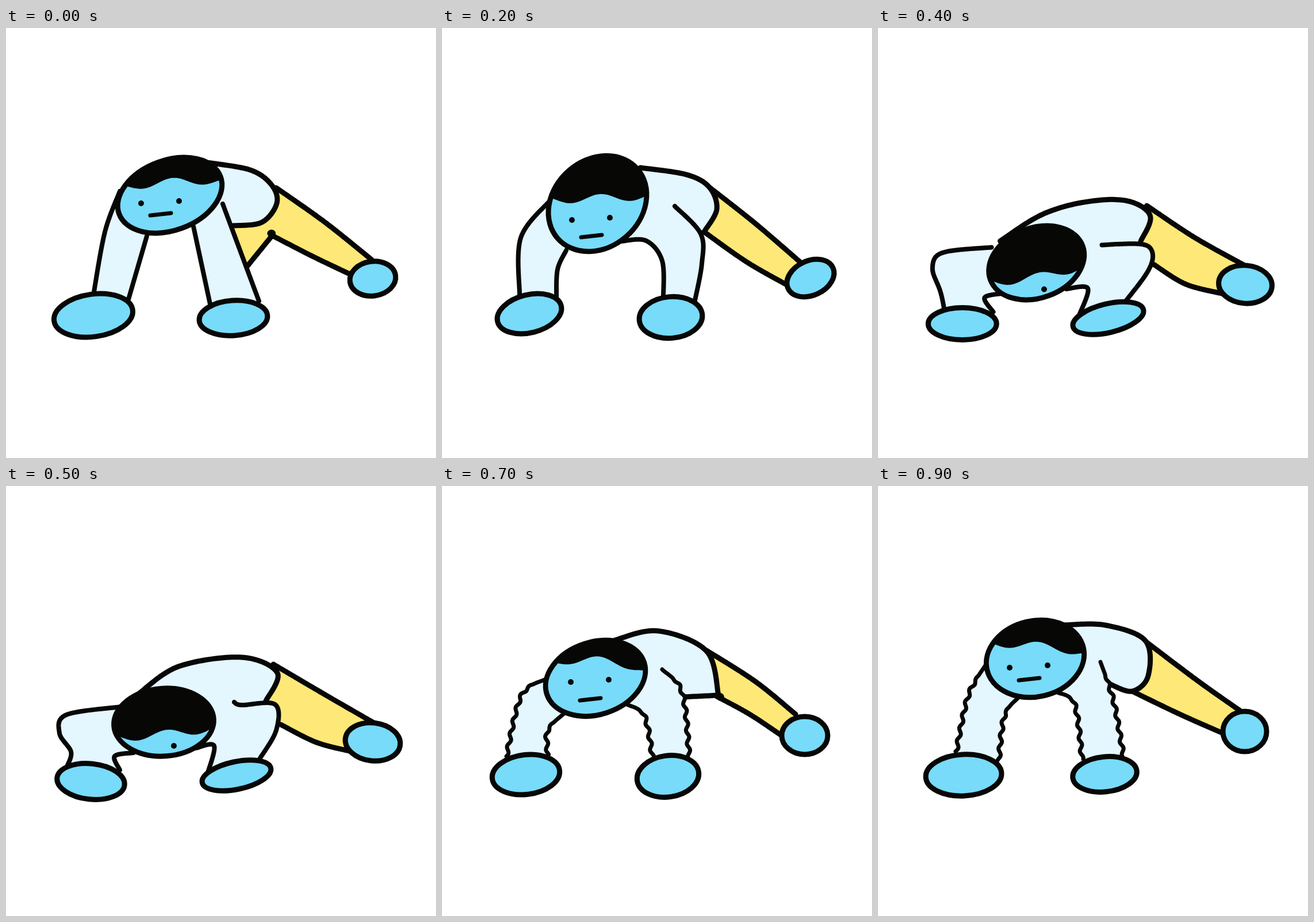
Recreate the animation shown at these times as an HTML page with a canvas. Size 748 by 748 pixels, loop 1 s.

```html
<!DOCTYPE html>
<html lang="en">
<head>
<meta charset="utf-8">
<title>Push-up</title>
<style>
  html, body { margin: 0; height: 100%; overflow: hidden; background: #fff; }
  canvas { display: block; width: 100vw; height: 100vh; }
</style>
</head>
<body>
<canvas width="748" height="748"></canvas>
<script>
const ctx = document.querySelector('canvas').getContext('2d');
const INK = '#070706', SKIN = '#78dbf9', SHIRT = '#e4f7fe', PANTS = '#fee877';
const STEP = 100, SAMPLES = 90, RIPPLE = 23;
const { PI, sin, cos, min, max, hypot, floor } = Math;

// Smooth curve through a few x,y pairs.
function curve(flat) {
  const n = flat.length / 2;
  const at = (i, d) => flat[2 * max(0, min(n - 1, i)) + d];
  return Array.from({ length: SAMPLES + 1 }, (_, i) => {
    const s = i / SAMPLES * (n - 1), j = min(floor(s), n - 2), f = s - j;
    return [0, 1].map(d => {
      const a = at(j - 1, d), b = at(j, d), c = at(j + 1, d), e = at(j + 2, d);
      return b + f / 2 * (c - a + f * (2 * a - 5 * b + 4 * c - e + f * (3 * (b - c) + e - a)));
    });
  });
}

// Sleeve wrinkles: an even ripple along the arc length that fades in below the shoulder.
function ripple(points, size) {
  let len = 0;
  return points.map(([x, y], i) => {
    const p = points[max(0, i - 1)], q = points[min(SAMPLES, i + 1)];
    const dx = q[0] - p[0], dy = q[1] - p[1], d = hypot(dx, dy) || 1;
    if (i) len += hypot(x - p[0], y - p[1]);
    const k = size * min(1, max(0, len / 20 - 1)) * sin(len / RIPPLE * 2 * PI) / d;
    return [x - dy * k, y + dx * k];
  });
}

// The fringe is a chord across the head with a dip and one and a half waves.
function fringe(headX, [left, right, dip]) {
  return Array.from({ length: SAMPLES + 1 }, (_, i) => {
    const u = i / SAMPLES;
    const wave = sin(PI * u) ** 0.5 || 0;
    return [headX - 88 + 176 * u, left + (right - left) * u + wave * (dip + 9 * cos(3 * PI * (u - 0.2)))];
  });
}

// Ellipses: [x, y, rx, ry, degrees]. Limbs: [edge, edge].
// Hair: [left y, right y, dip]. Face: [mouth x, mouth y, eye lift], or one eye [x, y].
function pose(p) {
  const arm = edges => edges.map(e => ripple(curve(e), p.wrinkle));
  return {
    ...p,
    leg: p.leg.map(curve), torso: curve(p.torso),
    left: arm(p.left), right: arm(p.right),
    hair: fringe(p.head[0], p.hair)
  };
}

function mix(a, b) {
  if (typeof a === 'number') return (a + b) / 2;
  if (Array.isArray(a)) return a.map((v, i) => mix(v, b[i]));
  return Object.fromEntries(Object.keys(a).map(k => [k, mix(a[k], b[k])]));
}

const high = pose({
  wrinkle: 0,
  leg: [[470,278, 555,338, 636,403], [420,414, 463,361, 463,361, 535,398, 600,429]],
  torso: [350,234, 425,247, 462,273, 471,305, 445,338, 395,344],
  left: [[198,284, 172,355, 152,465], [245,362, 213,472]],
  right: [[377,306, 440,475], [326,345, 355,480]],
  hands: [[152,500,69,37,-8], [395.5,504.5,59.5,30.5,-4]],
  foot: [638,436,40,30,-8],
  head: [285,291,94,61,-20],
  hair: [274, 264, 1],
  face: [269, 324, 19]
});

const lowering = pose({
  wrinkle: 0,
  leg: [[465,277, 545,340, 624,408], [455,354, 530,407, 602,448]],
  torso: [345,243, 425,255, 465,277, 478,315, 457,353],
  left: [[188,300, 137,365, 135,465], [216,387, 201,420, 199,468]],
  right: [[405,310, 450,358, 452,410, 440,474], [312,371, 355,370, 383,405, 385,470]],
  hands: [[152,497,57,33,-14], [398,503.5,55,36,-5]],
  foot: [641,435,43,30,-25],
  head: [270.5,305.5,92,76,-41],
  hair: [293, 289, 7],
  face: [260, 362, 28]
});

const low = pose({
  wrinkle: 0,
  leg: [[470,308, 545,365, 630,411], [482,408, 530,445, 595,462]],
  torso: [195,379, 270,336, 345,307, 430,298, 475,325, 462,368],
  left: [[195,379, 110,386, 97,432, 123,490], [214,459, 182,468, 203,494]],
  right: [[382,379, 450,371, 481,400, 422,474], [325,452, 368,454, 350,497]],
  hands: [[146,515,60,25,-6], [400,506,65,26,-15]],
  foot: [640,447,45,33,3],
  head: [277,406,84,63,-36],
  hair: [436, 395, 21],
  face: [286, 457]
});

const lowest = pose({
  wrinkle: 0,
  leg: [[465,310, 555,363, 640,412], [478,415, 540,446, 602,462]],
  torso: [230,362, 300,314, 410,298, 472,325, 452,374],
  left: [[200,384, 105,398, 93,430, 113,462, 107,486], [222,464, 189,470, 198,494]],
  right: [[397,376, 410,381, 468,380, 470,425, 441,475], [330,456, 362,452, 350,502]],
  hands: [[147.5,514,59,31,6], [401,503.5,61,24,-12]],
  foot: [638,445,48,33,7],
  head: [274.5,411,87,59,-4],
  hair: [432, 417, 9],
  face: [292, 452]
});

const pushing = pose({
  wrinkle: 2.5,
  leg: [[440,303, 550,346, 630,415], [465,380, 530,411, 600,461]],
  torso: [278,305, 365,282, 448,309, 467,380, 467,380, 418,388],
  left: [[188,367, 145,376, 110,430, 105,486], [212,423, 194,436, 192,485]],
  right: [[384,347, 412,368, 416,395, 438,474], [312,408, 345,418, 360,478]],
  hands: [[147.5,505.5,55.5,31,-7], [400.5,502,57.5,29.5,-6]],
  foot: [638,446,41,32,5],
  head: [266,368.5,84,56,-18],
  hair: [358, 352, 0],
  face: [260, 404, 18]
});

const rising = pose({
  wrinkle: 2.5,
  leg: [[460,286, 545,340, 615,397], [478,366, 535,397, 595,437]],
  torso: [298,269, 375,252, 460,287, 481,364, 481,364, 420,367],
  left: [[180,336, 138,365, 112,470], [212,396, 184,425, 184,467]],
  right: [[383,319, 418,360, 430,470], [322,380, 352,400, 366,470]],
  hands: [[146,502,59,34.5,-7], [393,505,54,36,-8]],
  foot: [631,434,40,33,0],
  head: [267,334.5,89,63,-18],
  hair: [309, 323, -11],
  face: [258, 371, 30]
});

const raised = pose({
  wrinkle: 2.5,
  leg: [[465,270, 555,338, 630,391], [442,357, 525,397, 602,431]],
  torso: [322,242, 395,242, 465,269, 470,330, 442,357, 402,344],
  left: [[188,310, 157,365, 136,462], [244,368, 220,400, 210,478]],
  right: [[387,306, 410,375, 427,470], [312,359, 342,380, 355,475]],
  hands: [[149,503,66,36,-3], [394.5,501.5,56,30.5,-6]],
  foot: [638,427,38,35,0],
  head: [273.5,300.5,86,66,-13],
  hair: [271, 290, -1],
  face: [263, 336, 20]
});

const cycle = [
  high, mix(high, lowering), lowering, low, mix(low, lowest),
  lowest, pushing, rising, mix(rising, raised), raised
];

function trace(points) {
  ctx.beginPath();
  points.forEach(p => ctx.lineTo(...p));
}

function fill(points, color) {
  trace(points);
  ctx.fillStyle = color;
  ctx.fill();
}

function line(points, width) {
  trace(points);
  ctx.lineWidth = width;
  ctx.stroke();
}

function oval([x, y, rx, ry, deg]) {
  ctx.beginPath();
  ctx.ellipse(x, y, rx, ry, deg * PI / 180, 0, 2 * PI);
  ctx.fillStyle = SKIN;
  ctx.fill();
  ctx.lineWidth = 9;
  ctx.stroke();
}

function dot(x, y) {
  ctx.beginPath();
  ctx.arc(x, y, 5, 0, 2 * PI);
  ctx.fillStyle = INK;
  ctx.fill();
}

// Every limb closes behind the head, which hides the seam.
function limb([a, b], head, color, width) {
  fill([...a, ...[...b].reverse(), head.slice(0, 2)], color);
  line(a, width);
  line(b, width);
}

function drawHead({ head, hair, face: [x, y, lift] }) {
  oval(head);
  ctx.save();
  ctx.clip();
  fill([...hair, [450, 100], [100, 100]], INK);
  ctx.restore();
  if (lift === undefined) return dot(x, y);
  dot(x - 34, y - lift);
  dot(x + 32, y - lift - 4);
  line([[x - 18, y + 2], [x + 18, y - 2]], 7);
}

function draw(p) {
  ctx.fillStyle = '#fff';
  ctx.fillRect(0, 0, 748, 748);
  ctx.strokeStyle = INK;
  ctx.lineCap = ctx.lineJoin = 'round';
  const sleeve = p.wrinkle ? 7 : 8;
  limb(p.leg, p.head, PANTS, 9);
  fill([...p.torso, p.head.slice(0, 2)], SHIRT);
  line(p.torso, 9);
  limb(p.left, p.head, SHIRT, sleeve);
  limb(p.right, p.head, SHIRT, sleeve);
  p.hands.forEach(oval);
  oval(p.foot);
  drawHead(p);
}

const start = performance.now();
function tick() {
  const t = max(0, performance.now() - start);
  draw(cycle[floor(t / STEP) % cycle.length]);
  requestAnimationFrame(tick);
}
tick();
</script>
</body>
</html>
```
